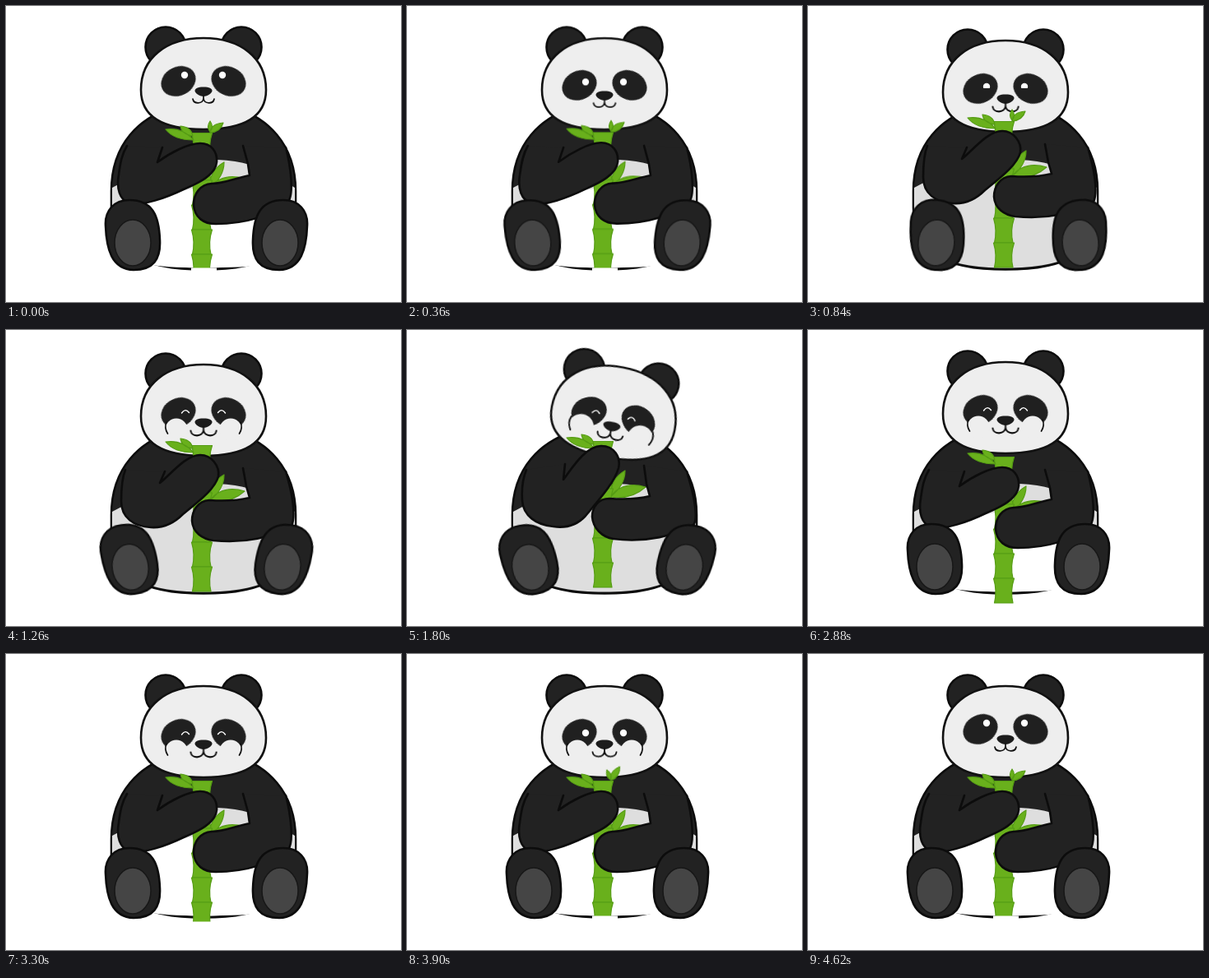
These frames come from a looping animation (480 by 360 pixels, 4.68 s). An HTML page:

```html
<!DOCTYPE html>
<html lang="en">
<head>
<meta charset="utf-8">
<title>Panda with bamboo</title>
<style>
html, body { margin: 0; width: 100%; height: 100%; overflow: hidden; background: #fff; }
svg { display: block; width: 100vw; height: 100vh; }

.fur { fill: #222; stroke: #0c0c0c; stroke-width: 2.6; stroke-linejoin: round; stroke-linecap: round; }
.line { fill: none; stroke: #111; stroke-width: 1.7; stroke-linecap: round; }
.green { fill: #69b01c; stroke: #559c14; stroke-width: 1.2; stroke-linejoin: round; }

.foot, .head, .face, .stalk, .armL, .armR, .shine, .smile, .cheek, .mouth, .sprig, .pale, .gap {
  animation: 4680ms linear infinite;
}
.foot { animation-name: foot; transform-origin: 155px 310px; animation-timing-function: ease-in-out; }
.head { animation-name: head; transform-origin: 240px 150px; animation-timing-function: ease-in-out; }
.face { animation-name: face; animation-timing-function: ease-in-out; }
.stalk { animation-name: stalk; animation-timing-function: ease-in-out; }
.armL { animation-name: armL; animation-timing-function: ease-in-out; }
.armR { animation-name: armR; animation-timing-function: ease-in-out; }
.shine { animation-name: shine; }
.smile { animation-name: smile; animation-timing-function: step-end; }
.cheek { animation-name: cheek; transform-origin: 204px 114px; }
.mouth { animation-name: mouth; transform-origin: 240px 110px; }
.sprig { animation-name: sprig; transform-origin: 248px 154px; }
.pale { animation-name: pale; animation-timing-function: step-end; }
.gap { animation-name: gap; animation-timing-function: step-end; }

@keyframes foot {
  0%, 47.9%, 100% { transform: rotate(0deg); }
  4.27%, 17.95%, 31.6%, 45.3% { transform: rotate(5deg); }
  11.1%, 24.8%, 38.5% { transform: rotate(-11deg); }
}
@keyframes head {
  0%, 6.4% { transform: translate(0, 0) rotate(0deg); }
  15%, 30.8% { transform: translate(0, 3px) rotate(0deg); }
  36.3%, 39.7% { transform: translate(1.5px, 4.5px) rotate(11deg); }
  42% { transform: translate(0, 0) rotate(9deg); }
  46.2%, 100% { transform: translate(0, 0) rotate(0deg); }
}
@keyframes face {
  0%, 2%, 89.7%, 100% { transform: translateY(0); }
  10.3%, 30.8%, 46.2%, 83.3% { transform: translateY(6px); }
  36.3%, 39.7% { transform: translateY(8px); }
}
@keyframes stalk {
  0%, 6.4%, 46.2%, 100% { transform: translateY(0); }
  15%, 30.8% { transform: translateY(-14px); }
  36.3%, 41% { transform: translateY(-19px); }
}
@keyframes armL {
  0%, 6.4%, 46.2%, 100% { d: path("M190 172L184 190C200 178 222 167 236 167C250 167 257 178 256 190C255 205 235 215 218 222C195 233 165 244 150 240C138 236 134 222 137 205C139 190 141 180 147 170"); }
  15%, 30.8% { d: path("M193 172L187 186C200 176 218 152 236 152C250 152 260 166 258 178C254 194 232 210 215 224C203 236 190 241 176 240C155 239 140 228 140 208C140 192 141 180 145 170"); }
  36.3%, 41% { d: path("M192 163L190 182C198 172 216 141 236 141C252 141 260 155 257 168C252 186 232 208 217 226C206 238 192 241 178 239C157 237 141 226 140 207C139 192 141 180 145 170"); }
}
@keyframes armR {
  0%, 6.4%, 46.2%, 100% { d: path("M288 170L294 192L296 206C280 209 265 216 250 216C236 217 228 228 228 242C229 257 240 265 255 265C290 265 325 255 343 238C350 228 346 195 340 172"); }
  15%, 30.8% { d: path("M288 168L292 190L296 204C280 208 262 208 247 207C233 208 226 220 226 232C227 246 238 254 252 256C290 260 325 252 347 238C353 225 347 195 340 172"); }
  36.3%, 41% { d: path("M288 165L291 187L295 202C280 206 262 206 246 205C232 205 225 216 225 227C226 241 237 252 251 254C290 259 328 250 349 236C354 225 347 195 340 172"); }
}
@keyframes shine {
  0%, 2% { transform: translateY(0); clip-path: inset(0); opacity: 1; }
  10.3%, 16.5% { transform: translateY(5px); clip-path: inset(0); opacity: 1; }
  17.95% { transform: translateY(5px); clip-path: inset(0 0 30% 0); opacity: 1; }
  19.2% { transform: translateY(6px); clip-path: inset(0 0 90% 0); opacity: 1; }
  19.3%, 79% { transform: translateY(6px); clip-path: inset(0 0 100% 0); opacity: 0; }
  79.1% { transform: translateY(6px); clip-path: inset(0 0 80% 0); opacity: 1; }
  81.5%, 84% { transform: translateY(6px); clip-path: inset(0); opacity: 1; }
  89.7%, 100% { transform: translateY(0); clip-path: inset(0); opacity: 1; }
}
@keyframes smile {
  0%, 79.1%, 100% { opacity: 0; }
  19.2% { opacity: 1; }
}
@keyframes cheek {
  0%, 18.5% { transform: translate(0, 16px) scale(1); opacity: 0; }
  20% { transform: translate(0, 12px) scale(1); opacity: 1; }
  23%, 30.8% { transform: translate(0, 0) scale(1); opacity: 1; }
  36.3%, 41% { transform: translate(-4px, 0) scale(1.15); opacity: 1; }
  46.2%, 84% { transform: translate(0, 0) scale(1); opacity: 1; }
  88.5% { transform: translate(0, 12px) scale(1); opacity: 1; }
  89.7%, 100% { transform: translate(0, 16px) scale(1); opacity: 0; }
}
@keyframes mouth {
  0%, 6.4%, 89.7%, 100% { transform: scale(1); }
  15%, 79% { transform: scale(1.2); }
  83.3% { transform: scale(1.12); }
}
@keyframes sprig {
  0%, 21.5%, 89.7%, 100% { transform: rotate(0deg) scale(1); }
  23.5% { transform: rotate(0deg) scale(0); }
  77% { transform: rotate(-22deg) scale(0); }
  81%, 83.3% { transform: rotate(-22deg) scale(1); }
}
@keyframes pale {
  0%, 46.2%, 100% { opacity: 1; }
  10.3% { opacity: 0; }
}
@keyframes gap {
  0%, 82%, 94.9%, 100% { transform: translateY(0); }
  8%, 71.8%, 92.3% { transform: translateY(16px); }
  70.5% { transform: translateY(7px); }
}
</style>
</head>
<body>
<svg viewBox="0 0 480 360" preserveAspectRatio="none">
  <defs>
    <path id="node" class="green" d="M225.500 152Q230 167 226.500 182H249Q245.500 167 250.500 152Z"/>
  </defs>

  <path class="fur" d="M200 124C165 136 128 165 128 225V245C128 300 165 320.500 240 320.500C315 320.500 352 300 352 245V225C352 165 315 136 280 124Z"/>
  <path d="M129 221L146 212L200 220L257 187Q280 188 296 193V210L336 212L351 221V245C351 299 315 318.500 240 318.500C165 318.500 129 299 129 245Z" fill="#dedede"/>
  <path class="pale" d="M170 240L205 226L228 222V242Q232 264 255 264L310 250L312 315Q290 318 240 318.500Q190 318 172 314Z" fill="#fff"/>

  <g class="head">
    <circle class="fur" data-mirror="480" cx="194" cy="50" r="24.500"/>
    <path d="M240 39C285 39 316 63 316 102C316 135 290 150 240 150C190 150 164 135 164 102C164 63 195 39 240 39Z" fill="#eee" stroke="#111" stroke-width="2.600"/>
    <g class="face">
      <g data-mirror="480">
        <ellipse cx="209.500" cy="91.500" rx="21.800" ry="17.500" transform="rotate(-26 209.500 91.500)" fill="#202020"/>
        <circle class="shine" cx="217" cy="84" r="4.200" fill="#fff"/>
        <path class="smile" d="M213.500 92Q218 85.500 222.500 91.500" fill="none" stroke="#fff" stroke-width="1.400" stroke-linecap="round"/>
        <g class="cheek">
          <circle cx="207" cy="112" r="13.500" fill="#eee"/>
          <path class="line" d="M196.500 117Q192 110 195 103"/>
        </g>
      </g>
      <path d="M240 98.500C247 98.500 250.500 100.500 250.500 103C250.500 106 245 109.800 240 109.800C235 109.800 229.500 106 229.500 103C229.500 100.500 233 98.500 240 98.500Z" fill="#1c1c1c"/>
      <path class="line mouth" d="M240 109V112.500C239 119.500 228 119.500 227 113M240 112.500C241 119.500 252 119.500 253 113"/>
    </g>
  </g>

  <g class="stalk">
    <path class="green" d="M247 222Q247 200 265 190Q265 208 247 222Q262 202 290 210Q272 226 247 222Z"/>
    <use href="#node" y="2.500"/>
    <use href="#node" y="30"/>
    <use href="#node" y="60"/>
    <use href="#node" y="90"/>
    <use href="#node" y="120"/>
    <use href="#node" y="150"/>
    <path class="green" d="M228 163Q204 163 194 150Q214 147 228 163ZM227 158Q213 156 212 146Q225 147 227 158Z"/>
    <path class="sprig green" d="M248 154Q249 143 264 142Q261 153 248 154ZM248 153Q243 147 248 140Q253 147 248 153Z"/>
  </g>
  <rect class="gap" x="225" y="318.500" width="31" height="16" fill="#fff"/>

  <path class="fur armR" d="M288 170L294 192L296 206C280 209 265 216 250 216C236 217 228 228 228 242C229 257 240 265 255 265C290 265 325 255 343 238C350 228 346 195 340 172"/>
  <path class="fur armL" d="M190 172L184 190C200 178 222 167 236 167C250 167 257 178 256 190C255 205 235 215 218 222C195 233 165 244 150 240C138 236 134 222 137 205C139 190 141 180 147 170"/>

  <g data-mirror="487">
    <g class="foot">
      <path class="fur" d="M150 236C131 236 120 249 121 267C122 295 128 320 155 321C179 321 188 308 187 285C186 255 178 236 150 236Z"/>
      <ellipse cx="154" cy="288" rx="22" ry="28" fill="#454545" stroke="#171717" stroke-width="1.500"/>
    </g>
  </g>
</svg>
<script>
// Real copies rather than <use>, so both sides share one animation clock.
for (const part of document.querySelectorAll('[data-mirror]')) {
  const twin = part.cloneNode(true);
  twin.setAttribute('transform', `translate(${part.dataset.mirror} 0) scale(-1 1)`);
  part.after(twin);
}
</script>
</body>
</html>
```
